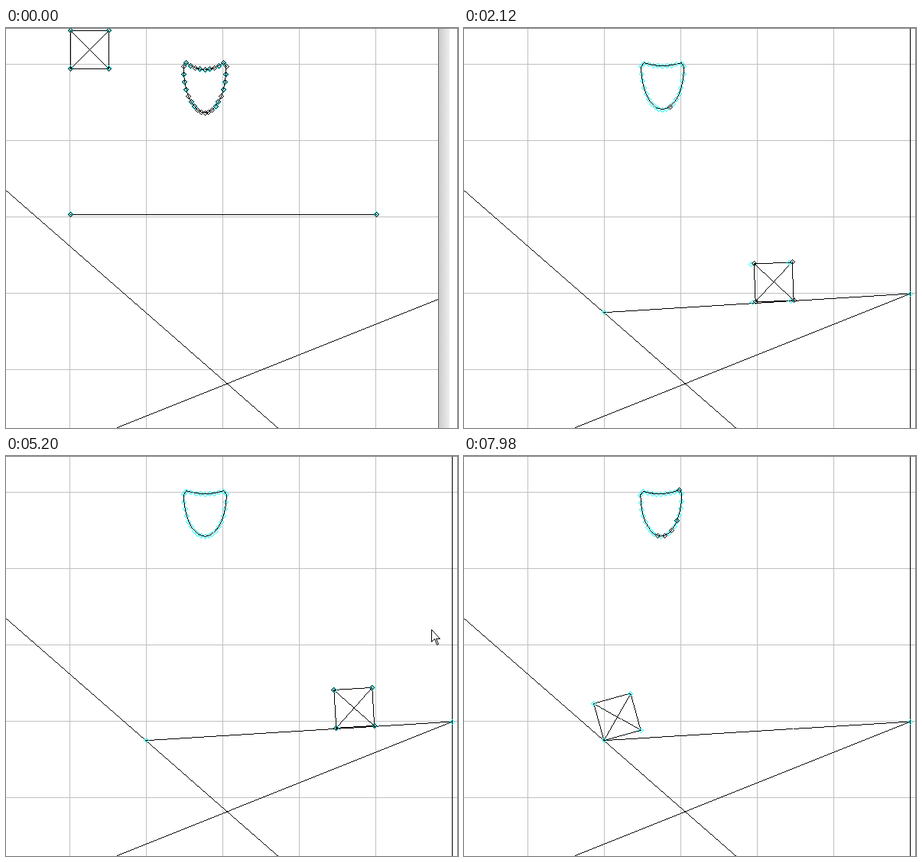
These frames come from a looping animation (591x524 px, 8000 ms). An HTML page with a canvas:

```html
<!DOCTYPE html>
<html lang="en">
<head>
<meta charset="utf-8">
<title>Falling box simulation</title>
<style>
  html, body { margin: 0; width: 100%; height: 100%; overflow: hidden; background: #fff; }
  canvas { display: block; }
</style>
</head>
<body>
<canvas id="stage" width="591" height="524"></canvas>
<script>
const ctx = document.getElementById('stage').getContext('2d');
const LOOP = 8000, STEP = 59.1, LAG = 15;
const GRAVITY = 5.34e-4, HEAD_START = 100;
const BLACK = '#000', CYAN = '#00ffff', GRID = '#c0c0c0', EDGE = '#808080';

const clamp01 = v => Math.min(1, Math.max(0, v));
const progress = (t, from, to) => clamp01((t - from) / (to - from));

// ---- Crisp one-pixel drawing ----
function line([x0, y0], [x1, y1], color = BLACK) {
  ctx.fillStyle = color;
  const n = Math.max(1, Math.round(Math.max(Math.abs(x1 - x0), Math.abs(y1 - y0))));
  for (let i = 0; i <= n; i++)
    ctx.fillRect(Math.round(x0 + (x1 - x0) * i / n), Math.round(y0 + (y1 - y0) * i / n), 1, 1);
}

function polygon(points, color) {
  points.forEach((p, i) => line(p, points[(i + 1) % points.length], color));
}

function marker([px, py], color) {
  const x = Math.round(px), y = Math.round(py);
  polygon([[x - 3, y], [x, y - 3], [x + 3, y], [x, y + 3]], color);
}

function fillPath(points, x, y, fill, stroke) {
  ctx.fillStyle = fill;
  ctx.strokeStyle = stroke;
  ctx.beginPath();
  points.forEach(([px, py]) => ctx.lineTo(Math.round(x) + px + .5, Math.round(y) + py + .5));
  ctx.closePath();
  ctx.fill();
  ctx.stroke();
}

// ---- Motion ----
const slopeY = x => 212.7 + .8752 * x;
const rampY = x => 523 - .4007 * (x - 145);
const plankY = x => 372.4 - .0607 * (x - 183);
// Everything is already falling when the loop begins.
const fall = t => GRAVITY / 2 * ((t + HEAD_START) ** 2 - HEAD_START ** 2);

// The plank drops, then its left end slides down the slope.
function plank(t) {
  const d = 655 * progress(t, 305, 960);
  const lx = 84 + .115 * d + 5.6e-5 * d * d;
  const ly = Math.min(244 + fall(t), slopeY(lx) - 1);
  const ry = Math.min(244 + fall(t), rampY(lx + 399.5));
  return [[lx, ly], [lx + Math.sqrt(400 ** 2 - (ry - ly) ** 2), ry]];
}

// Centre and angle (degrees) of the box.
function boxPose(t) {
  if (t < 840) return [109, 28 + fall(t), 0];
  if (t < 1120) {                       // down the slope
    const d = t - 840, x = 109 + .275 * d + 1.5e-4 * d * d;
    return [x, slopeY(x - 25) - 25, 3 * d / 280];
  }
  if (t < 1700) {                       // rocking onto the plank
    const f = progress(t, 1120, 1700), hop = Math.sin(Math.PI * f);
    const x = 198 + 112 * f + 2 * hop;
    return [x, plankY(x) - 26.5 - 4.4 * hop, 3 - 5.3 * f - 16.3 * hop];
  }
  if (t < 7500) {                       // up to the wall and back
    const rising = t < 2870, d = t - (rising ? 2120 : 2870);
    const x = (rising ? 403 + .2157 * d : 557.7 - .012 * d) - 1.38e-5 * d * d;
    return [x, plankY(x) - 26.5, rising ? -2.3 : -3.4];
  }
  const f = progress(t, 7500, 7980);    // tipping over the lower left corner
  const angle = -3.4 - 12 * f * (2 - f), a = angle * Math.PI / 180;
  return [182.5 + 25 * (Math.cos(a) + Math.sin(a)), 372 + 25 * (Math.sin(a) - Math.cos(a)), angle];
}

function boxCorners(t) {
  const [x, y, angle] = boxPose(t);
  const a = angle * Math.PI / 180, c = 25 * Math.cos(a), s = 25 * Math.sin(a);
  return [[x - c + s, y - s - c], [x + c + s, y + s - c],
          [x + c - s, y + s + c], [x - c - s, y - s + c]];
}

// A half ellipse closed by a shallow curve, still settling from a stretch.
function blobNodes(t) {
  const stretch = 6 * Math.exp(-t / 1500), sag = 5 * Math.exp(-t / 500);
  const lean = progress(t, 7300, 7980);
  const nodes = [];
  for (let i = 0; i <= 18; i++) {
    const a = Math.PI * i / 18;
    nodes.push([259.5 + 28 * Math.cos(a), 49.5 + (55 + stretch) * Math.sin(a)]);
  }
  for (let i = -4; i <= 4; i++) {
    const s = i / 4;
    nodes.push([259.5 + 24.5 * s, 49 - 4 * s * s + sag * (1 - s * s)]);
  }
  return nodes.map(([x, y]) => {
    const side = (x - 259) / 28;
    return [x - lean * (1.8 + side) + .4 * Math.sin(t / 190), y - lean * side];
  });
}

// ---- Scene ----
function drawGrid() {
  ctx.fillStyle = '#fff';
  ctx.fillRect(0, 0, 591, 524);
  for (let x = 83; x < 591; x += 100) line([x, 0], [x, 523], GRID);
  for (let y = 47; y < 524; y += 100) line([0, y], [590, y], GRID);
}

function drawJoints(points, trail) {
  points.forEach(p => marker(p, BLACK));
  trail.forEach(p => marker(p, CYAN));
}

function drawBlob(t) {
  const nodes = blobNodes(t), step = Math.round(t / STEP);
  const share = Math.exp(-t / 750) + .02 + .17 * progress(t, 7000, 7980);
  nodes.forEach(([x, y]) => marker([x, y + .6], CYAN));
  polygon(nodes);
  nodes.forEach((p, i) => {
    const noise = Math.abs(Math.sin(i * 12.9898 + step * 78.233) * 43758.5453) % 1;
    if (noise < share) marker(p, BLACK);
  });
}

function drawFrame(showBar) {
  if (showBar) {
    const shade = ctx.createLinearGradient(566, 0, 581, 0);
    shade.addColorStop(0, '#cccccc');
    shade.addColorStop(1, '#f0f0f0');
    ctx.fillStyle = '#fff';
    ctx.fillRect(565, 0, 26, 524);
    ctx.fillStyle = shade;
    ctx.fillRect(565, 0, 15, 524);
    line([565, 0], [565, 523], '#606060');
  }
  line([0, 0], [590, 0], EDGE);
  line([590, 0], [590, 523], EDGE);
}

const ARROW = [[0, 0], [0, 16], [4, 12], [7, 20], [9, 19], [6, 12], [11, 12]];
const RESIZE = [[-10, 0], [-5, -5], [-5, -1], [5, -1], [5, -5], [10, 0],
                [5, 5], [5, 1], [-5, 1], [-5, 5]];

function drawCursor(t) {
  if (t > 1300 && t < 1750) {
    fillPath(RESIZE, 569 + 12 * progress(t, 1420, 1700), 322, BLACK, '#fff');
  } else if (t > 3340 && t < 7500) {
    const f = progress(t, 3830, 6970);
    fillPath(ARROW, 563 - 15 * f, 238 - 48 * f ** 1.8, '#fff', BLACK);
  }
}

function draw(t) {
  drawGrid();
  line([0, 212.7], [355, 523.4]);
  line([145, 523], [583, 347.5]);
  line([583, 0], [583, 523]);

  const ends = plank(t), corners = boxCorners(t);
  line(...ends);
  drawJoints(ends, plank(t - LAG));
  polygon(corners);
  line(corners[0], corners[2]);
  line(corners[1], corners[3]);
  drawJoints(corners, boxCorners(t - LAG));
  drawBlob(t);

  drawFrame(t < 1540);
  drawCursor(t);
}

function tick() {
  const t = performance.now() % LOOP;
  draw(Math.floor(t / STEP + .2) * STEP);
  requestAnimationFrame(tick);
}
tick();
</script>
</body>
</html>
```
